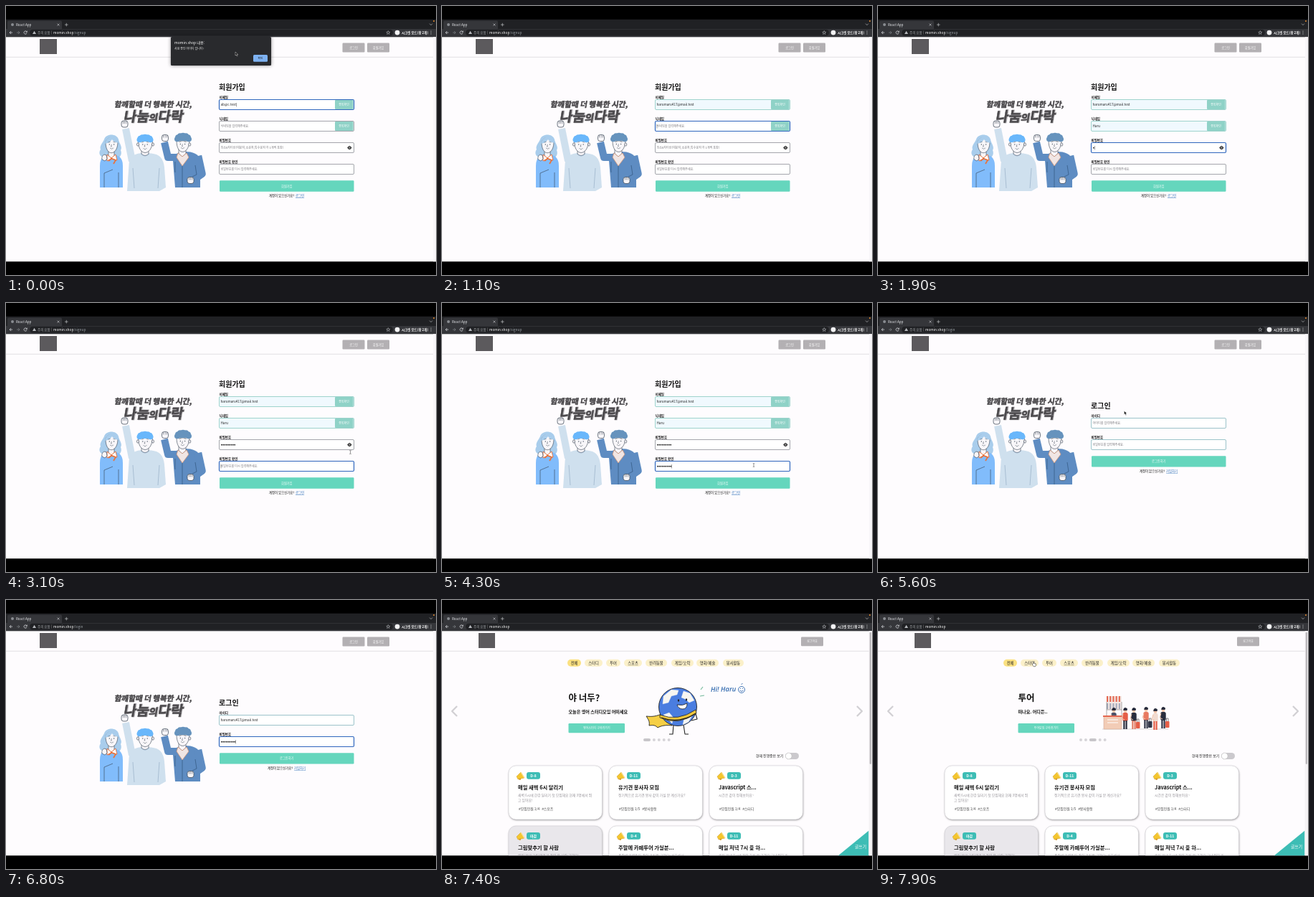
Write an HTML page with a canvas that moves like this. It is 600x375 px and loops after 8 s.

```html
<!DOCTYPE html>
<html lang="ko">
<head>
<meta charset="utf-8">
<title>Sign-up demo</title>
<style>
html, body { margin: 0; width: 100%; height: 100%; overflow: hidden; background: #000; }
canvas { display: block; width: 600px; height: 375px; }
</style>
</head>
<body>
<canvas id="stage"></canvas>
<script>
const LOOP = 8000, STEP = 100;
const SCREEN_TOP = 18.75, PAGE_TOP = 43.3, PAGE_END = 356.25;
const FONT = '"Noto Sans CJK KR", "Noto Sans CJK", "Noto Sans", sans-serif';
const TEAL = '#65d6bd', PAGE = '#fefcfe', INK = '#111', LINE = '#34414f', SKIN = '#f8f6f9';
const EMAIL = 'harumaru417@mail.test', NICK = 'Haru', BRAND = ['나눔', '의', '다락'];

const canvas = document.getElementById('stage');
const ctx = canvas.getContext('2d');
const ratio = window.devicePixelRatio || 1;
canvas.width = 600 * ratio;
canvas.height = 375 * ratio;

function box(x, y, w, h, fill, r = 0, stroke, lw = 0.7) {
  ctx.beginPath();
  ctx.roundRect(x, y, w, h, r);
  if (fill) { ctx.fillStyle = fill; ctx.fill(); }
  if (stroke) { ctx.strokeStyle = stroke; ctx.lineWidth = lw; ctx.stroke(); }
}

function shape(d, fill, stroke, lw = 0.6) {
  const p = new Path2D(d);
  if (fill) { ctx.fillStyle = fill; ctx.fill(p); }
  if (stroke) { ctx.strokeStyle = stroke; ctx.lineWidth = lw; ctx.stroke(p); }
}

function oval(x, y, rx, ry, fill, stroke, lw = 0.6) {
  ctx.beginPath();
  ctx.ellipse(x, y, rx, ry, 0, 0, Math.PI * 2);
  if (fill) { ctx.fillStyle = fill; ctx.fill(); }
  if (stroke) { ctx.strokeStyle = stroke; ctx.lineWidth = lw; ctx.stroke(); }
}

function text(s, x, y, size, color = INK, weight = 400, align = 'left') {
  ctx.font = `${weight} ${size}px ${FONT}`;
  ctx.textAlign = align;
  ctx.fillStyle = color;
  ctx.fillText(s, x, y);
  return ctx.measureText(s).width;
}

const centered = (s, x, y, size, color, weight) =>
  text(s, x, y + size * 0.36, size, color, weight, 'center');

function button(s, x, y, w, h, color, size = 4.2) {
  box(x, y, w, h, color, 1.2);
  centered(s, x + w / 2, y + h / 2, size, '#fff', 500);
}

// Number of characters typed at time t
const typed = (t, start, end, count) =>
  Math.round(count * Math.min(1, Math.max(0, (t - start) / (end - start))));

function along(t, points) {
  for (let i = 1; i < points.length; i++) {
    const [t0, x0, y0] = points[i - 1], [t1, x1, y1] = points[i];
    if (t <= t1) {
      const k = Math.max(0, (t - t0) / (t1 - t0));
      return [x0 + (x1 - x0) * k, y0 + (y1 - y0) * k];
    }
  }
  return points[points.length - 1].slice(1);
}

function browser(path) {
  box(0, 0, 600, 375, '#000');
  box(0, SCREEN_TOP, 600, 14, '#202124');
  box(2, 20.5, 76, 13, '#35363a', 2);
  box(0, 32, 600, PAGE_TOP - 32, '#35363a');
  box(33, 32.8, 507, 8.6, '#202124', 4.3);
  oval(597, 21, 1, 1, '#e58a2c');

  ctx.save();
  ctx.translate(0, -0.9);
  oval(9, 27, 2, 2, '#8a8d92');
  text('React App', 14, 28.6, 4.6, '#e8eaed', 500);
  shape('M71.5 25.5l3 3m0-3l-3 3M82 27h4.6m-2.3-2.3v4.6M591 25.5l2 2 2-2', null, '#d5d7da');
  shape('M9 38H5m2-2l-2 2 2 2', null, '#e8eaed', 0.7);
  shape('M15 38h4m-2-2l2 2-2 2', null, '#85888c', 0.7);
  shape('M28.8 36.6a2.1 2.1 0 1 0 .3 2.1M29.3 35.5v1.8h-1.8', null, '#e8eaed', 0.7);
  shape('M39.5 35.7l2.5 4.3h-5z', '#b4b7bb');
  text('주의 요함', 44, 39.7, 4.5, '#a6a9ad', 500);
  box(63, 35.5, 0.5, 5, '#777');
  const w = text('momin.shop', 66, 39.7, 4.8, '#fff', 500);
  text(path, 66 + w, 39.7, 4.8, '#9aa0a6');
  shape('M533.3 35.5l.7 1.7 1.8.1-1.4 1.2.5 1.8-1.6-1-1.6 1 .5-1.8-1.4-1.2 1.8-.1z', null, '#dadce0', 0.5);
  oval(546, 38, 3.4, 3.4, '#f4f4f5');
  text('시크릿 모드(창 2개)', 552, 39.7, 4.5, '#fff', 700);
  for (let y = 36; y <= 40; y += 2) oval(593, y, 0.5, 0.5, '#e8eaed');
  ctx.restore();

  box(0, PAGE_TOP, 600, PAGE_END - PAGE_TOP, PAGE);
  box(0, 70.8, 600, 1, '#e1dfe2');
  box(596, PAGE_TOP, 4, PAGE_END - PAGE_TOP, '#f8f6f9');
}

function slanted(s, x, y, size, shadow) {
  ctx.save();
  ctx.transform(1, 0, -0.17, 1, x, y);
  ctx.font = `900 ${size}px ${FONT}`;
  ctx.textAlign = 'left';
  if (shadow) {
    ctx.lineWidth = 1.6;
    ctx.strokeStyle = shadow;
    ctx.strokeText(s, 0.9, 0.9);
  }
  ctx.fillStyle = ctx.strokeStyle = '#4b494c';
  ctx.lineWidth = 0.5;
  ctx.fillText(s, 0, 0);
  ctx.strokeText(s, 0, 0);
  const w = ctx.measureText(s).width;
  ctx.restore();
  return w;
}

function face(x, y, smile = 1) {
  oval(x - 3.2, y - 1, 0.6, 0.7, LINE);
  oval(x + 3.2, y - 1, 0.6, 0.7, LINE);
  shape(`M${x - 5} ${y - 4}l3-.6M${x + 2} ${y - 4.6}l3 .6M${x} ${y - 1}l-1 3h1.3`, null, LINE, 0.5);
  shape(`M${x - 2.4} ${y + 4}q2.4 ${2.4 * smile} 4.8 0`, '#fff', LINE, 0.5);
}

function fist(x, y) {
  box(x - 4.5, y - 4.5, 9, 9, SKIN, 3, LINE, 0.7);
  for (let i = -1; i <= 1; i++) box(x + i * 2.3 - 0.2, y - 4, 0.5, 3.5, LINE);
}

// Wavy hair: a row of overlapping lobes on an arc
function curls(x, y, rx, ry, color) {
  for (let i = 0; i <= 6; i++) {
    const a = Math.PI * (1 + i / 6);
    oval(x + rx * Math.cos(a), y + ry * Math.sin(a), 4, 3.8, color);
  }
}

function cheering() {
  slanted('함께할때 더 행복한 시간,', 151, 140.7, 10.6);
  let x = 163.5;
  BRAND.forEach((part, i) => { x += slanted(part, x, 160.5, i === 1 ? 13.5 : 19.2, '#b9b7ba'); });

  // Woman in a blue top
  shape('M137 186c2-8 17-9 20 0 1 6 6 10 3 15 2 5 0 9-3 10h-20c-7-1-8-7-5-11-2-5 3-9 5-14z', '#a9cdec');
  shape('M131 253v-30c0-12 6-16 16-16s16 4 16 16v30z', '#81bcfb');
  shape('M143 202h8v7l-4 4-4-4z', SKIN, LINE);
  shape('M139 190c0 20 16 19 17 1-1-9-16-10-17-1z', SKIN, LINE);
  shape('M138 192c1-12 18-13 19-1-5-1-7-2-9-5-3 4-5 5-10 6z', '#a9cdec');
  face(147.5, 194);
  shape('M141 207l6 5 6-5 2 8-8-2-6 3z', '#fff', '#e8743f', 1);
  shape('M146 212l7 3-3 5M147 213l-4 3', null, '#e8743f', 1.8);
  shape('M137 253v-20l12-5m8 25v-21', null, LINE);
  shape('M134 214q-1-5 3-7l3 1 1 5-3 3z', SKIN, LINE);

  // Man with a raised arm
  shape('M167 171L176 216', null, '#cfe0ee', 10);
  shape('M169 258l3-43c4-9 13-10 22-10 18 0 25 4 27 20l2 28-9 5z', '#cfe0ee');
  fist(165.5, 164.5);
  shape('M189 200h10v6q-5 5-10 0z', SKIN, LINE);
  shape('M184.5 188c0 22 19 22 20 0z', SKIN, LINE);
  curls(194, 186.5, 7.5, 4, '#69b7fb');
  box(186, 182, 16, 7, '#69b7fb', 2);
  oval(184, 193, 1.5, 2.2, SKIN, LINE);
  oval(205, 193, 1.5, 2.2, SKIN, LINE);
  face(194, 194, 1.5);
  shape('M177 226l2 28m35-28l-2 28M188 206q6 6 12 0', null, '#8da7bf');

  // Man in a jacket
  shape('M236 253l-3-37c1-11 9-13 16-13 12 0 20 3 22 12v38z', '#5e8cc2');
  shape('M221 190L226 211 239 211', null, '#5e8cc2', 10);
  shape('M268 209L273.5 234 262 242', null, '#5e8cc2', 10.5);
  shape('M264 222l2 13-6 3m-24-21v15', null, '#31577f', 0.7);
  fist(222, 184);
  fist(257.5, 243);
  shape('M241 199h10v7l-5 4-5-4z', SKIN, LINE);
  shape('M238 188c0 21 17 20 18 0z', SKIN, LINE);
  curls(247, 185.5, 8, 5, '#6693bd');
  box(239, 181, 17, 7, '#6693bd', 2);
  oval(256.3, 193, 1.5, 2.2, SKIN, LINE);
  face(246.5, 193.5);
  shape('M240 205l6 5 6-5 3 6-9 12-8-12z', '#f1e6e4', '#d99a7a', 0.8);
  shape('M246 223v30', null, '#31577f', 0.7);
}

function field(y, value, hint, { focus, valid, check, dots, edge = '#8d9097' } = {}) {
  const border = focus ? '#2f66bd' : valid ? '#88c9c1' : edge;
  box(297.5, y - 0.5, 188, 14, valid ? '#f0f9fe' : '#fff', 1.5, border, focus ? 1.2 : 0.8);
  const middle = y + 6.7;
  let end = 299.5;
  if (dots) {
    for (let i = 0; i < dots; i++) oval(300.8 + i * 2.3, middle, 0.85, 0.85, INK);
    end += dots * 2.3;
  } else if (value) {
    end += text(value, 299.5, middle + 1.6, 4.6, '#222', 500);
  } else {
    text(hint, 299.5, middle + 1.5, 4.1, '#77757b');
  }
  if (focus) box(end + 0.3, middle - 2.7, 0.4, 5.4, '#222');
  if (check) {
    box(459, y, 25.6, 13, '#8fd2c7', 1);
    centered('중복확인', 471.5, middle, 4, '#fff', 500);
  }
}

const label = (s, y) => text(s, 297.5, y, 4.5, INK, 700);

function footer(question, link, x, linkX, y) {
  text(question, x, y, 4.4, INK, 500);
  const w = text(link, linkX, y, 4.4, '#2468b4', 500);
  box(linkX, y + 0.8, w, 0.4, '#2468b4');
}

function eye(x, y) {
  shape(`M${x - 3} ${y}q3-5 6 0q-3 5-6 0z`, '#111');
  oval(x, y, 1.25, 1.25, '#fff');
  oval(x, y, 0.7, 0.7, '#111');
}

function account() {
  box(47, 46, 24, 21, '#5c5a5d');
  button('로그인', 469.5, 51.5, 31, 13, '#b3b0b3');
  button('회원가입', 504, 51.5, 31, 13, '#b3b0b3');
  cheering();
}

function signup(t) {
  browser('/signup');
  account();
  const nick = NICK.slice(0, typed(t, 1100, 1500, 4));
  const first = typed(t, 1810, 2600, 9), second = typed(t, 3200, 4200, 9);
  const email = t < 200 ? 'ab@c.test' : EMAIL.slice(0, typed(t, 200, 800, 21));
  const focus = t < 1000 ? 0 : t < 1800 ? 1 : t < 3100 ? 2 : 3;

  text('회원가입', 297, 117, 10, INK, 700);
  label('이메일', 129.3);
  field(131, email, '이메일을 입력해주세요.', { focus: focus === 0, valid: t >= 1000, check: true });
  label('닉네임', 159.3);
  field(161, nick, '닉네임을 입력해주세요.', { focus: focus === 1, valid: t >= 1700, check: true });
  label('비밀번호', 189.3);
  field(191, '', '최소8자이상(대문자,소문자,특수문자 각 1개씩 포함)', { focus: focus === 2, dots: first });
  eye(479.3, 197.5);
  label('비밀번호 확인', 219.3);
  field(221, '', '비밀번호를 다시 입력해주세요.', { focus: focus === 3, dots: second });
  button('회원가입', 298, 243.3, 187.5, 15.5, TEAL);
  footer('계정이 있으신가요?', '로그인', 367, 404, 266.3);

  if (t < 100) warning();
  if (t >= 2900) {
    const [x, y] = along(t, [[2900, 526, 190], [3300, 435, 226], [4500, 435, 226], [4900, 391, 251], [5200, 391, 251], [5500, 350, 165]]);
    if (t < 4700) beam(x, y); else pointer(x, y);
  }
}

function warning() {
  ctx.save();
  ctx.shadowColor = '#0007';
  ctx.shadowBlur = 5 * ratio;
  box(230, 43, 140, 40, '#292a2d', 1.5);
  ctx.restore();
  text('momin.shop 내용:', 235, 52.6, 5.1, '#fff', 500);
  text('사용 중인 아이디 입니다!', 235, 61, 4, '#f1f1f1', 500);
  box(345, 68, 20, 9.8, '#7eb2f2', 1.5);
  centered('확인', 355, 72.9, 3.8, '#202124', 500);
  pointer(320, 64);
}

function login(t) {
  browser('/login');
  account();
  const id = EMAIL.slice(0, typed(t, 6000, 6400, 21));
  const dots = typed(t, 6400, 6700, 9);
  text('로그인', 297, 147, 10, INK, 700);
  label('아이디', 159.3);
  field(161, id, '아이디를 입력해주세요.', { focus: t >= 6000 && t < 6400, edge: '#83b5bd' });
  label('비밀번호', 189.3);
  field(191, '', '비밀번호를 입력해주세요.', { focus: t >= 6400, dots, edge: '#83b5bd' });
  button('로그인하기', 298, 213.3, 187.5, 15.2, TEAL);
  footer('계정이 없으신가요?', '가입하기', 365, 402, 236.3);
  if (t < 6000) pointer(...along(t, [[5500, 350, 165], [5600, 343.5, 150.5], [5800, 343.5, 150.5]]));
}

function pointer(x, y) {
  shape(`M${x} ${y}v5l1.2-1 1 1.9.9-.5-.9-1.8h1.6z`, '#111', '#fff', 0.4);
}

function beam(x, y) {
  shape(`M${x - 1.2} ${y - 2.5}q1.2 0 1.2.7v3.6q0 .7-1.2.7m2.4-5q-1.2 0-1.2.7m0 3.6q0 .7 1.2.7`, null, '#333', 0.5);
}

function hand(x, y) {
  shape(`M${x} ${y}v-2.5q.7-.8 1.2 0v1.7l2.6.7v2.4l-.8 1.4h-2.3l-2-2.5z`, '#fff', '#111', 0.5);
}

const CHIPS = [['전체', 175, 19], ['스터디', 199, 25], ['투어', 229, 20], ['스포츠', 254, 25],
  ['반려동물', 284, 30], ['게임/오락', 320, 31], ['영화/예술', 355, 31], ['봉사활동', 392, 29]];

const CARDS = [
  ['D-8', '매일 새벽 6시 달리기', '새벽 6시에 한강 달리기 첫 모집해요 현재 3명에서 뛰', '1/4', '#스포츠', '고 있어요!'],
  ['D-11', '유기견 봉사자 모집', '정기적으로 유기견 봉사 같이 가실 분 계신가요?', '1/5', '#봉사활동'],
  ['D-3', 'Javascript 스...', '시간은 같이 정해보아요~', '1/4', '#스터디'],
  ['마감', '그림맞추기 할 사람', '매일 저녁 그림 맞추기 같이 할 사람 구해요!'],
  ['D-4', '주말에 카페투어 가실분...', '주말에 카페투어 같이 가실분 구해요! 서울에서'],
  ['D-11', '매일 저녁 7시 윷 하...', '매일 저녁 7시에 같이 하실 분 구해요 그냥 편하게']
];

function card([due, title, note, seats, tag, more], i) {
  const x = 93 + (i % 3) * 140, y = i < 3 ? 231 : 315;
  ctx.save();
  ctx.shadowColor = '#0006';
  ctx.shadowBlur = 2.5 * ratio;
  ctx.shadowOffsetX = 0.5 * ratio;
  ctx.shadowOffsetY = ratio;
  box(x, y, 130.5, 75, i === 3 ? '#e9e7eb' : '#fff', 10);
  ctx.restore();
  box(x, y, 130.5, 75, null, 10, '#c9c7cc', 0.5);

  ctx.save();
  ctx.translate(x + 16, y + 14);
  shape('M-5 1L1-5 6 3-3 5z', '#f4c62f', '#c18c20', 0.4);
  shape('M1-5l5 8', null, '#fbe394', 1.4);
  shape('M-2 4l1 2 2-.5v-2', '#d79b26');
  ctx.restore();
  box(x + 25, y + 9, 19, 9.7, '#3dbdb5', 3);
  centered(due, x + 34.5, y + 13.8, 5, '#fff', 700);
  text(title, x + 13, y + 33, 7.3, INK, 700);
  text(note, x + 13, y + 43, 4.85, '#98959b');
  if (more) text(more, x + 13, y + 50, 4.85, '#98959b');
  if (seats) {
    const w = text(`#모집인원 ${seats}`, x + 14, y + 62.3, 4.9, '#444');
    text(tag, x + 17 + w, y + 62.3, 4.9, '#444');
  }
}

function globe() {
  shape('M308 158c-8 4-14 5-23 4 3 5 5 7 4 13 7-1 9 0 12 3 5-3 12-4 20-3z', '#f5cf45', '#222', 0.9);
  shape('M323 174l-1 13h-5m20-13l2 13h5M353 155l3 11-8 2', null, '#222', 1.1);
  oval(329, 149, 26.5, 26.5, '#4a7de0', '#222', 0.9);
  shape('M309 134l11-9 10 1-2 6-8 2-4 9-8 2zM337 127l9 3 6 10-7 3-6-5-5-2zM309 160l8-3 6 7-2 8zM338 164l12-4-6 10-8 4z', '#f7f6f1', '#dce6f5', 0.4);
  shape('M304 160q25 10 50-7l1 5q-26 18-51 6z', '#f2c83d', '#222', 0.8);
  shape('M306 164q25 9 48-6', null, '#222', 1.2);
  oval(330, 140, 1.2, 1.8, '#222');
  oval(341, 139, 1.2, 1.8, '#222');
  shape('M328 146q8 2 14-2 0 8-6 8-6 0-8-6z', '#fff', '#222', 0.8);
  shape('M361 125l3-4m-4 13l6-1', null, '#72b89a', 1.1);
  ctx.save();
  ctx.translate(375, 128);
  ctx.rotate(-0.02);
  ctx.font = 'italic 600 9.4px "Open Sans", sans-serif';
  ctx.textAlign = 'left';
  ctx.fillStyle = '#3169ae';
  ctx.fillText('Hi! ' + NICK, 0, 0);
  ctx.restore();
  oval(418, 125, 4.5, 4.5, null, '#3169ae', 0.9);
  shape('M415.5 126q2.5 3 5 0m-4-3v1m3-1v1m-2-6l2-2', null, '#3169ae', 0.9);
}

function traveller(x, y, coat, legs, bag) {
  oval(x, y, 2.4, 2.9, '#f4c5aa');
  shape(`M${x - 2.7} ${y}q0-4 3-4 4 1 2 4z`, '#282b3b');
  box(x - 3.7, y + 3, 7.4, 12, coat, 2.5);
  shape(`M${x - 1.6} ${y + 14}v12m3.2-12v12`, null, legs, 2.2);
  shape(`M${x - 3} ${y + 5}l-2 6 4 2`, null, '#f4c5aa', 1);
  if (bag) {
    box(x + 3, y + 16, 5.5, 9, bag, 1);
    shape(`M${x + 4.5} ${y + 16}v-4h2.5v4`, null, '#333');
  }
}

function travel() {
  shape('M313 180h92', null, '#bbb');
  box(319, 134, 21, 19, '#f3e7e4');
  for (let i = 0; i < 5; i++) {
    box(319 + i * 4.2, 134, 2.1, 8, '#e46852');
    box(319 + i * 4.2, 144, 2.1, 8, '#a4a9ba');
  }
  shape('M319 142v20m21-20v20M319 153h21', null, '#777');
  traveller(329, 154, '#4c5268', '#333');
  box(315, 162, 25, 18, '#f2ccb6', 0.5, '#c99a86', 0.5);
  box(314, 161, 27, 2, '#e46852');
  shape('M320 167h15m-15 4h15', null, '#fff', 1);
  traveller(345, 154, '#e55e47', '#292d3d');
  traveller(357, 154, '#292d3d', '#e07b62', '#e55e47');
  traveller(374, 153, '#e8785f', '#33384a', '#33384a');
  traveller(387, 155, '#f1dbd0', '#e55e47');
  traveller(398, 153, '#292d3d', '#343849', '#e55e47');
}

function banner(title, sub, action, x, draw, active) {
  text(title, x, 141.3, 12.5, INK, 700);
  text(sub, x, 158, 6.1, INK, 700);
  button(action, x, 172, 78.5, 13.3, TEAL, 4);
  draw();
  let dot = 281;
  for (let i = 0; i < 5; i++) {
    const w = i === active ? 10 : 4;
    box(dot, 193, w, 4, i === active ? '#c7c5c9' : '#d6d4d8', 2);
    dot += w + 2.9;
  }
}

function home(t) {
  browser('');
  box(51, 46, 23, 21, '#5c5a5d');
  button('로그아웃', 501, 51.5, 31, 12.8, '#b3b0b3', 4);
  CHIPS.forEach(([name, x, w], i) => {
    box(x, 82.8, w, 10, i ? '#fbf0c9' : '#fbe181', 5);
    centered(name, x + w / 2, 87.8, 5.3, '#222', 500);
  });
  if (t < 7800) banner('야 너두?', '오늘은 영어 스터디모임 어떠세요', '영어스터디 구하러가기', 176.5, globe, 0);
  else banner('투어', '떠나요. 어디든..', '투어모임 구하러가기', 195.5, travel, 2);
  shape('M21 148l-7 7 7 7M579 148l7 7-7 7', null, '#d2d0d4', 2.3);

  text('현재 진행중만 보기', 438, 219.3, 4.9, '#222', 500);
  box(479, 213, 19, 9, '#cbc9cd', 4.5);
  oval(483.7, 217.5, 4.4, 4.4, '#fff', '#bbb', 0.6);

  ctx.save();
  ctx.beginPath();
  ctx.rect(0, PAGE_TOP, 600, PAGE_END - PAGE_TOP);
  ctx.clip();
  CARDS.forEach(card);
  shape('M552 357l43.5-35.5V357z', '#3dbdb5');
  centered('글쓰기', 584, 344, 5.8, '#fff', 500);
  box(595.5, PAGE_TOP, 4.5, 313, '#f5f3f5');
  box(596.7, 45, 2.3, 184, '#b9b7ba', 1.2);
  ctx.restore();
  if (t >= 7800) hand(...along(t, [[7800, 222, 94], [7900, 216.5, 89]]));
}

function draw(elapsed) {
  const t = Math.floor((elapsed % LOOP) / STEP) * STEP;
  ctx.setTransform(ratio, 0, 0, ratio, 0, 0);
  ctx.lineJoin = 'round';
  if (t < 5500) signup(t);
  else if (t < 6900) login(t);
  else home(t);
}

const start = performance.now();
function tick() {
  draw(performance.now() - start);
  requestAnimationFrame(tick);
}
tick();
</script>
</body>
</html>
```
